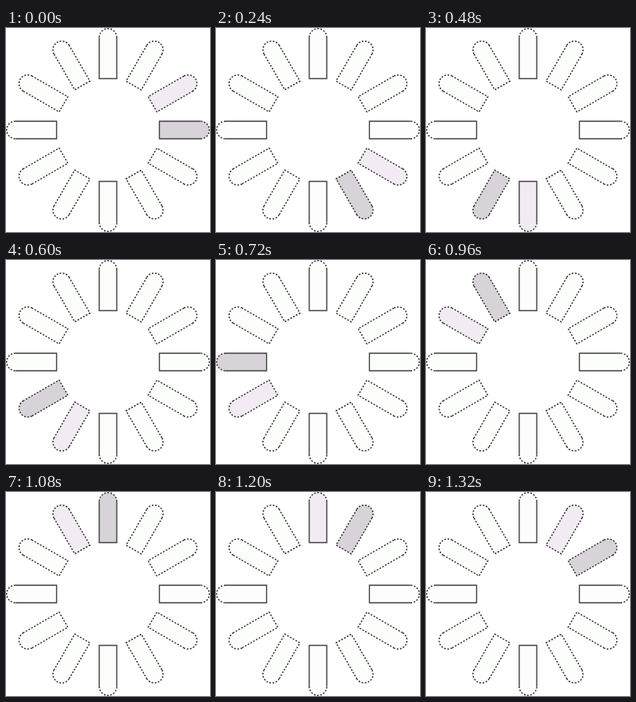
An HTML page for the animation above (1440 ms loop, 256 by 256 pixels).

```html
<!DOCTYPE html>
<html lang="en">
<head>
<meta charset="utf-8">
<title>Spinner</title>
<style>
  html, body { margin: 0; width: 100%; height: 100%; overflow: hidden; background: #fff; }
  svg { display: block; width: 100vw; height: 100vh; }
  path { fill: none; stroke: #404040; stroke-width: 1.4; }
  .fill { stroke: none; }
  .dotted { stroke: #2c2c2c; stroke-width: 1.5; stroke-dasharray: 2 2; }
</style>
</head>
<body>
<svg id="stage" viewBox="0 0 256 256"></svg>
<script>
  const COUNT = 12, STEP = 120;
  const IDLE = '#fcfefb', TRAIL = '#f2ebf3', HEAD = '#d8d3d8';
  const INNER = 64.5, OUTER = 127.2, HALF = 11;
  const NECK = OUTER - HALF;

  const stage = document.getElementById('stage');

  function add(parent, tag, attrs) {
    const node = document.createElementNS('http://www.w3.org/2000/svg', tag);
    for (const key in attrs) node.setAttribute(key, attrs[key]);
    return parent.appendChild(node);
  }

  const sides = `M${NECK} ${-HALF}H${INNER}V${HALF}H${NECK}`;
  const arc = `A${HALF} ${HALF} 0 0 0 ${NECK} ${-HALF}`;
  const cap = `M${NECK} ${HALF}${arc}`;

  // Bars run clockwise, starting at the right
  const bars = Array.from({ length: COUNT }, (_, i) => {
    const group = add(stage, 'g', { transform: `translate(128 128) rotate(${i * 360 / COUNT})` });
    const fill = add(group, 'path', { d: sides + arc + 'Z', class: 'fill' });
    add(group, 'path', { d: sides, class: i % 3 ? 'dotted' : '' });
    add(group, 'path', { d: cap, class: 'dotted' });
    return fill;
  });

  function draw(time) {
    const head = Math.floor(time / STEP) % COUNT;
    bars.forEach((bar, i) => {
      const lag = (head - i + COUNT) % COUNT;
      bar.style.fill = lag === 0 ? HEAD : lag === 1 ? TRAIL : IDLE;
    });
  }

  const start = performance.now();
  function tick() {
    draw(performance.now() - start);
    requestAnimationFrame(tick);
  }
  tick();
</script>
</body>
</html>
```
